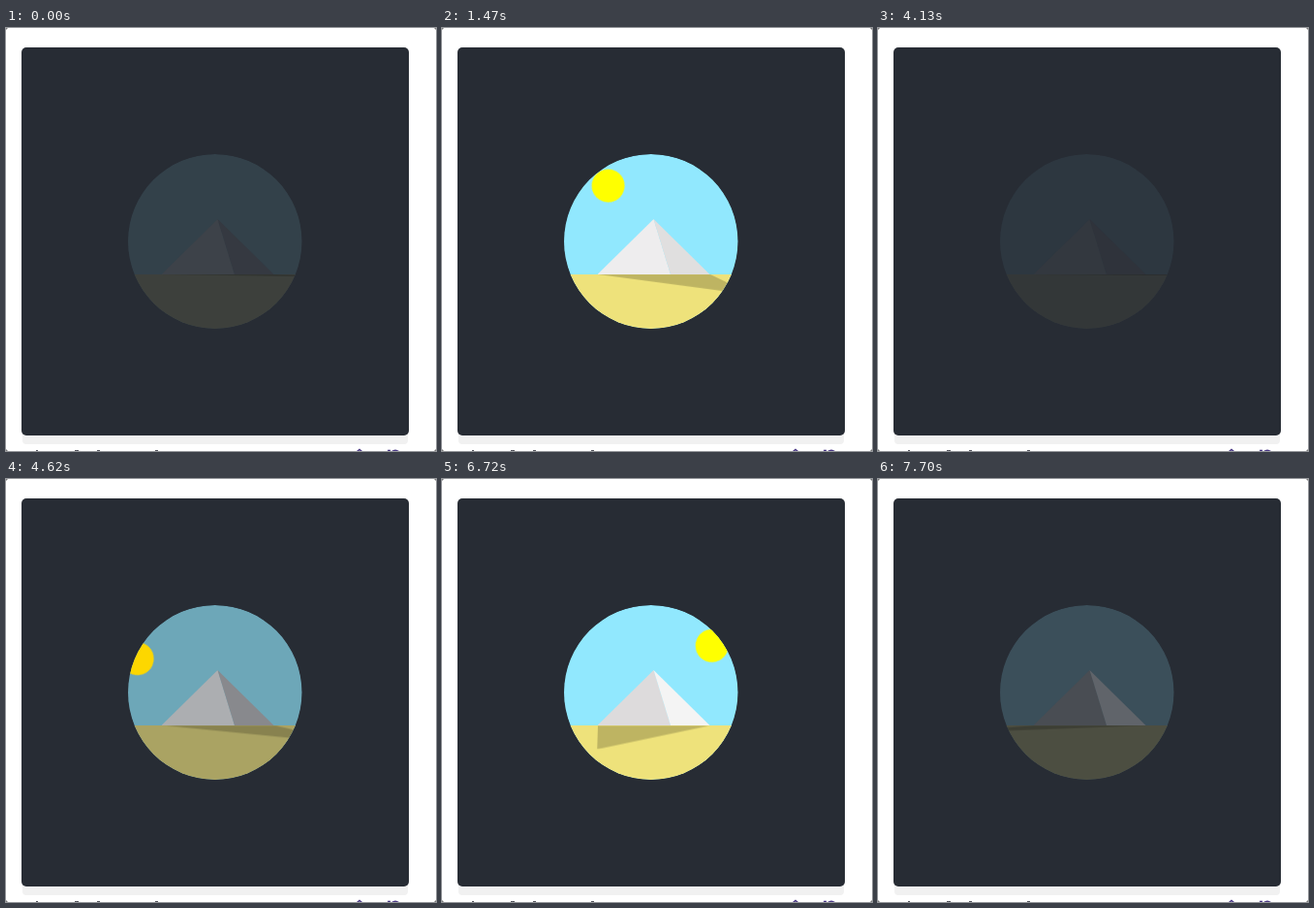
Animation of 444 by 436 pixels, one loop 7770 ms. Source, as an HTML page:

```html
<!DOCTYPE html>
<html lang="en">
<head>
<meta charset="utf-8">
<title>Desert day</title>
<style>
  :root {
    --night: #272c34;
    --day: 4200ms cubic-bezier(.4, 0, .49, 1) infinite paused;
  }
  html, body {
    margin: 0;
    width: 100%;
    height: 100%;
    overflow: hidden;
    background: #fff;
  }
  .stage { position: relative; width: 444px; height: 436px; overflow: hidden; }
  .stage div, .edge { position: absolute; }
  .edge { left: 0; top: 0; }

  .card {
    left: 15.5px;
    top: 20px;
    width: 400px;
    height: 400px;
    border-radius: 5px;
    background: var(--night);
    box-shadow: 0 10px 0 -1px #f1f1f1;
  }
  .scene {
    left: 110px;
    top: 110px;
    width: 180px;
    height: 180px;
    border-radius: 50%;
    overflow: hidden;
    clip-path: circle(90px);
  }
  .sky { inset: 0; animation: sky var(--day); }
  .sun {
    left: 73px;
    top: 7px;
    width: 34px;
    height: 34px;
    border-radius: 50%;
    transform-origin: 50% 400%;
    animation: sun var(--day);
  }
  .sand { left: 0; top: 124px; width: 180px; height: 56px; animation: sand var(--day); }
  .side { left: 35px; top: 67px; width: 116px; height: 57px; }
  .left { clip-path: polygon(0 100%, 58px 0, 75.5px 100%); animation: left var(--day); }
  .right {
    clip-path: polygon(58px 0, 75.5px 100%, 100% 100%);
    animation: right var(--day);
    animation-timing-function: cubic-bezier(.47, 0, .61, 1);
  }
  .shadow {
    left: -80px;
    top: 124px;
    width: 360px;
    height: 30px;
    background: rgba(0, 0, 0, .2);
    transform-origin: 50% 0;
    animation: shadow var(--day);
  }

  @keyframes sky {
    0%, 100% { background: var(--night); }
    30%, 70% { background: #91e8fe; }
  }
  @keyframes sand {
    0%, 100% { background: var(--night); }
    30%, 70% { background: #eee27b; }
  }
  @keyframes sun {
    0% { background: #f98a00; transform: rotate(-70deg); }
    30% { background: #ff0; transform: rotate(-28deg); }
    70% { background: #ff0; }
    100% { background: #f98a00; transform: rotate(70deg); }
  }
  @keyframes left {
    0%, 100% { background: var(--night); }
    30% { background: #f2f2f2; }
    70% { background: #dddbdc; }
  }
  @keyframes right {
    0%, 100% { background: var(--night); }
    30% { background: #dddbdb; }
    70% { background: #f4f4f4; }
  }
  @keyframes shadow {
    0% { transform: scaleY(0); clip-path: polygon(115px 0, 231px 0, 360px 100%); }
    30% { transform: scaleY(1); clip-path: polygon(115px 0, 231px 0, 293px 100%); }
    55% { transform: scaleY(.4); }
    75% { transform: scaleY(1); }
    100% { transform: scaleY(0); clip-path: polygon(115px 0, 231px 0, 0 100%); }
  }
</style>
</head>
<body>
<div class="stage">
  <div class="card">
    <div class="scene">
      <div class="sky"></div>
      <div class="sun"></div>
      <div class="sand"></div>
      <div class="shadow"></div>
      <div class="side left"></div>
      <div class="side right"></div>
    </div>
  </div>
  <!-- tops of the caption row and the window corners -->
  <svg class="edge" width="444" height="436" fill="none">
    <path d="M31 435.5h2M71 435.5h4M94 435.5h3M154 435.5h3" stroke="#55565e"/>
    <path d="M362 437l3-2.5 3 2.5M394 435.5h3M398 437q4-3.5 8 0" stroke="#4b3a86" stroke-width="1.5"/>
    <path d="M0 0h2L0 2zM444 0h-2l2 2zM0 436h2l-2-2zM444 436h-2l2-2z" fill="#777"/>
  </svg>
</div>
<script>
  const LOOP = 7770, STEP = 70, OFFSET = 270;
  const parts = document.getAnimations();

  function draw() {
    const t = performance.now() % LOOP;
    const held = Math.floor(t / STEP) * STEP;
    for (const part of parts) part.currentTime = held + OFFSET;
    requestAnimationFrame(draw);
  }
  draw();
</script>
</body>
</html>
```
